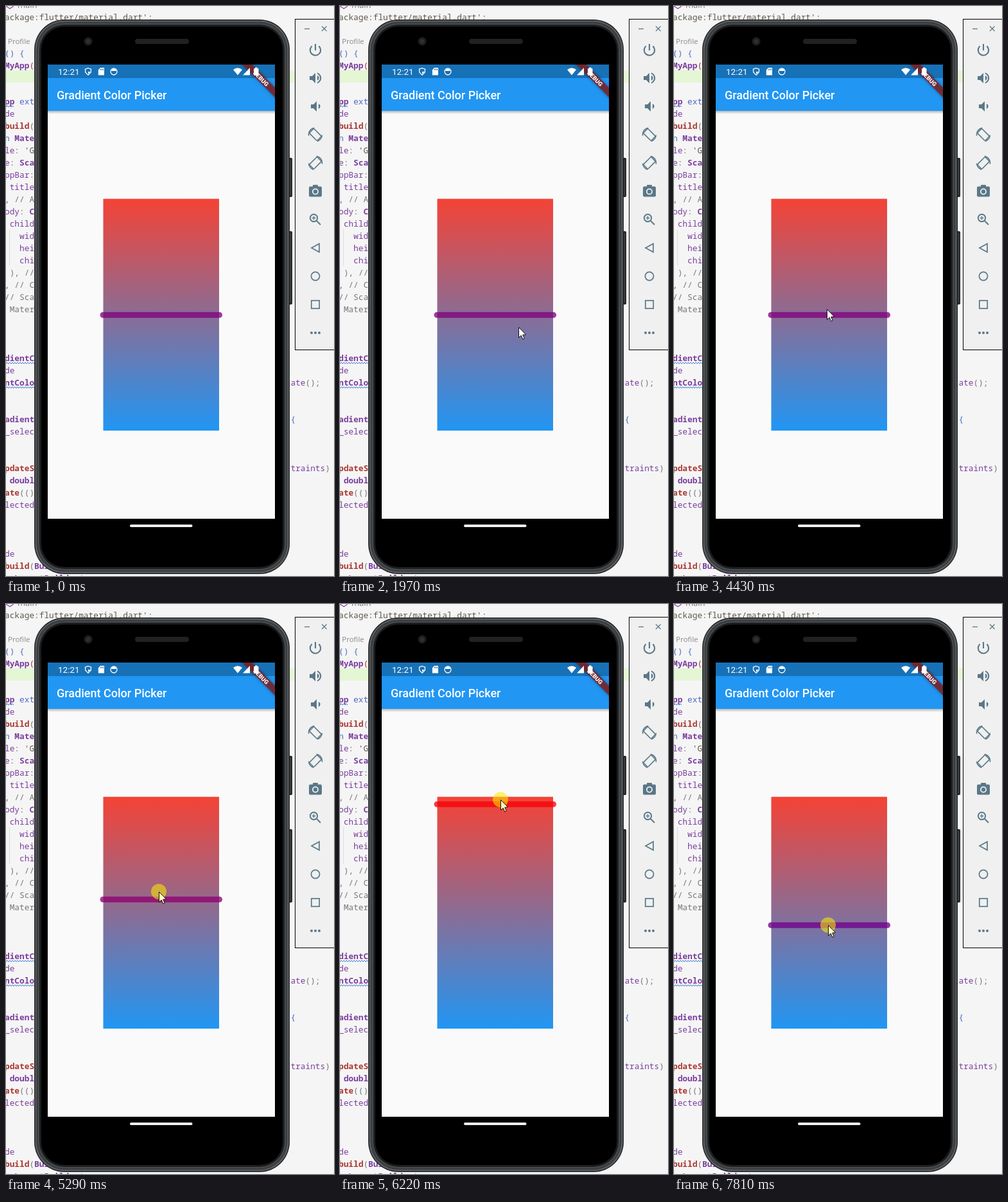
Animation of 511x886 px, one loop 8 s. Source, as an HTML page with a canvas:

```html
<!DOCTYPE html>
<html lang="en">
<head>
<meta charset="utf-8">
<title>Gradient Color Picker</title>
<style>
html, body { margin: 0; width: 100%; height: 100%; overflow: hidden; background: #f5f5f5; }
canvas { display: block; width: 511px; height: 886px; }
</style>
</head>
<body>
<canvas id="stage"></canvas>
<script>
const W = 511, H = 886, LOOP = 8000;
const canvas = document.getElementById('stage');
const dpr = window.devicePixelRatio || 1;
canvas.width = W * dpr;
canvas.height = H * dpr;
let ctx = canvas.getContext('2d');

const MONO = '"Noto Sans Mono", "DejaVu Sans Mono", monospace';
const SANS = 'Roboto, sans-serif';
const PURPLE = '#7a3e9d', RED = '#aa3731', BLUE = '#4b69c6', GRAY = '#777777', INK = '#5f584c';
const CHAR = 7.68;

// ---------- drawing helpers ----------
function box(x, y, w, h, r, fill) {
  ctx.beginPath();
  ctx.roundRect(x, y, w, h, r);
  ctx.fillStyle = fill;
  ctx.fill();
}
function disc(x, y, r, fill) {
  ctx.beginPath();
  ctx.arc(x, y, r, 0, Math.PI * 2);
  ctx.fillStyle = fill;
  ctx.fill();
}
function ring(x, y, r, from = 0, to = Math.PI * 2) {
  ctx.beginPath();
  ctx.arc(x, y, r, from, to);
  ctx.stroke();
}
function poly(points, close = true) {
  ctx.beginPath();
  points.forEach(([x, y]) => ctx.lineTo(x, y));
  if (close) ctx.closePath();
}
function label(str, x, y, font, fill) {
  ctx.font = font;
  ctx.fillStyle = fill;
  ctx.fillText(str, x, y);
}

// ---------- editor behind the phone ----------
// Each row: vertical centre, then [column, text, colour, bold]
const CODE = [
  [17, [0, "ackage:flutter/material.dart';", INK]],
  [73, [0, '() {', BLUE]],
  [92, [0, 'MyApp', PURPLE, 1], [5, '(', RED]],
  [148, [0, 'pp', PURPLE, 1], [3, 'ext', BLUE]],
  [167, [0, 'de', PURPLE]],
  [186, [0, 'build', RED, 1], [5, '(', GRAY]],
  [205, [0, 'n', BLUE], [2, 'Mate', PURPLE, 1]],
  [224, [0, 'le', PURPLE], [2, ':', GRAY], [4, "'G", INK]],
  [243, [0, 'e', PURPLE], [1, ':', GRAY], [3, 'Sca', PURPLE, 1]],
  [262, [0, 'ppBar', PURPLE], [5, ':', GRAY]],
  [281, [1, 'title', PURPLE]],
  [300, [0, ', // A', GRAY]],
  [319, [0, 'ody', PURPLE], [3, ':', GRAY], [5, 'C', PURPLE, 1]],
  [338, [1, 'child', PURPLE]],
  [357, [3, 'wid', PURPLE]],
  [376, [3, 'hei', PURPLE]],
  [395, [3, 'chi', PURPLE]],
  [414, [1, '), //', GRAY]],
  [433, [0, ', // C', GRAY]],
  [452, [0, '// Sca', GRAY]],
  [471, [1, 'Mater', GRAY]],
  [547, [0, 'dientC', PURPLE, 1]],
  [566, [0, 'de', PURPLE]],
  [585, [0, 'ntColo', PURPLE, 1], [57, 'tate', PURPLE], [61, '();', GRAY]],
  [642, [0, 'adient', PURPLE, 1], [58, '{', BLUE]],
  [661, [0, '_selec', PURPLE]],
  [718, [0, 'pdateS', RED, 1], [57, 'straints', PURPLE], [65, ')', GRAY]],
  [737, [1, 'doubl', PURPLE, 1]],
  [756, [0, 'ate', RED, 1], [3, '(()', GRAY]],
  [775, [0, 'lected', PURPLE]],
  [851, [0, 'de', PURPLE]],
  [870, [0, 'build', RED, 1], [5, '(', GRAY], [6, 'Bui', PURPLE, 1]],
  [889, [0, 'n', BLUE], [2, 'LayoutBuilder', PURPLE, 1], [15, '(', GRAY]]
];

function squiggle(y, end) {
  ctx.beginPath();
  for (let x = -2, i = 0; x <= end; x += 2, i++) ctx.lineTo(x, y + (i % 2 ? 1.1 : -1.1));
  ctx.strokeStyle = '#3f7fd6';
  ctx.lineWidth = 1;
  ctx.stroke();
}

function drawEditor() {
  ctx.fillStyle = '#f5f5f5';
  ctx.fillRect(0, 0, W, H);
  ctx.fillStyle = '#e4f6d4';
  ctx.fillRect(0, 100, 450, 19);
  ctx.fillStyle = '#dcdcdc';
  ctx.fillRect(5, 347, 1, 57);

  ctx.strokeStyle = PURPLE;
  ctx.lineWidth = 1.1;
  poly([[1, -3], [1, 1], [6, 4], [11, 1], [11, -3]], false);
  ctx.stroke();
  label('main', 18, 3, '13px "Open Sans", sans-serif', GRAY);
  label('Profile', 3, 59, '11.5px "Open Sans", sans-serif', '#8a8a8a');
  ctx.fillStyle = '#aaaaaa';
  ctx.fillRect(-1, 50, 1, 10);

  for (const [y, ...parts] of CODE)
    for (const [col, str, fill, bold] of parts)
      label(str, -2 + col * CHAR, y + 4.5, (bold ? 'bold ' : '') + '12.8px ' + MONO, fill);

  squiggle(156, 13);
  squiggle(555, 44);
  squiggle(593, 44);
}

// ---------- phone ----------
function drawFrame() {
  box(438, 236, 8, 61, 2, '#252627');
  box(438, 350, 8, 114, 2, '#252627');
  ctx.fillStyle = '#4a4c4e';
  ctx.fillRect(443, 239, 1, 55);
  ctx.fillRect(443, 353, 1, 108);

  const layers = [[0, '#222324'], [1.5, '#5d6163'], [3.5, '#3a3d3f'], [6, '#47494b'], [8, '#1c1d1e'], [11, '#000000']];
  for (const [d, fill] of layers)
    box(44 + d, 21 + d, 398 - 2 * d, 862 - 2 * d, 47 - d, fill);

  disc(128, 55, 6.5, '#1d1e1f');
  disc(128, 55, 3.5, '#2d2f31');
  box(201, 51, 84, 8, 4, '#202122');
  box(193, 806, 97.5, 4, 2, '#f2f2f2');
}

function drawStatusIcons() {
  label('12:21', 81, 106.5, '13.5px ' + SANS, '#ffffff');
  ctx.strokeStyle = ctx.fillStyle = '#ffffff';
  ctx.lineWidth = 1.3;

  // shield
  poly([[128, 96.5], [132.5, 98.2], [132.3, 103], [128, 107.4], [123.7, 103], [123.5, 98.2]]);
  ctx.stroke();
  poly([[128, 98], [128, 102], [131.5, 102], [128, 106]]);
  ctx.fill();

  // memory card
  poly([[147, 96], [153, 96], [153, 107.5], [143.8, 107.5], [143.8, 99.5]]);
  ctx.fill();
  ctx.fillStyle = '#1872ba';
  for (const x of [147, 149, 151]) ctx.fillRect(x, 97.5, 1, 2.5);

  ring(168, 102, 5);
  ctx.fillStyle = '#ffffff';
  ctx.fillRect(164.5, 98, 7, 3);

  // wifi, signal, battery
  ctx.beginPath();
  ctx.moveTo(361, 107.5);
  ctx.lineTo(354, 99);
  ctx.quadraticCurveTo(361, 93.5, 368, 99);
  ctx.fill();
  poly([[369, 107.5], [380, 107.5], [380, 96]]);
  ctx.fill();
  box(386, 97, 7.5, 11, 1, '#ffffff');
  ctx.fillRect(388, 95.5, 3.5, 2);
}

function drawScreen() {
  ctx.save();
  ctx.beginPath();
  ctx.rect(65, 91, 354, 706);
  ctx.clip();
  ctx.fillStyle = '#fafafa';
  ctx.fillRect(65, 91, 354, 706);

  const shade = ctx.createLinearGradient(0, 163, 0, 168);
  shade.addColorStop(0, 'rgba(0,0,0,.27)');
  shade.addColorStop(1, 'rgba(0,0,0,0)');
  ctx.fillStyle = shade;
  ctx.fillRect(65, 163, 354, 5);
  ctx.fillStyle = '#2196f3';
  ctx.fillRect(65, 112, 354, 51);
  ctx.fillStyle = '#1771b7';
  ctx.fillRect(65, 91, 354, 21);
  label('Gradient Color Picker', 79, 144.8, '500 18px ' + SANS, '#ffffff');

  ctx.save();
  ctx.translate(419, 91);
  ctx.rotate(Math.PI / 4);
  ctx.shadowColor = 'rgba(0,0,0,.5)';
  ctx.shadowBlur = 5 * dpr;
  ctx.fillStyle = 'rgba(135,30,30,.78)';
  ctx.fillRect(-40, 25.2, 80, 10.8);
  ctx.shadowColor = 'transparent';
  ctx.textAlign = 'center';
  label('DEBUG', 0, 34, '900 9.2px ' + SANS, '#ffffff');
  ctx.restore();

  drawStatusIcons();

  const fade = ctx.createLinearGradient(0, 300, 0, 660);
  fade.addColorStop(0, '#f44336');
  fade.addColorStop(1, '#2196f3');
  ctx.fillStyle = fade;
  ctx.fillRect(151.5, 299.7, 180.5, 360.3);
  ctx.restore();
}

// ---------- emulator toolbar ----------
function speaker(x, y) {
  poly([[x, y - 3], [x + 4, y - 3], [x + 9, y - 8], [x + 9, y + 8], [x + 4, y + 3], [x, y + 3]]);
  ctx.fill();
  ctx.beginPath();
  ctx.arc(x + 10.5, y, 4, -1.2, 1.2);
  ctx.fill();
}

function rotateIcon(y, flip) {
  ctx.save();
  ctx.translate(482, y);
  ctx.scale(flip, 1);
  ring(0, 0, 10.5, Math.PI * 0.95, Math.PI * 1.45);
  ring(0, 0, 10.5, Math.PI * 0.02, Math.PI * 0.42);
  ctx.rotate(Math.PI / 4);
  ctx.beginPath();
  ctx.roundRect(-8.5, -5, 17, 10, 1.5);
  ctx.stroke();
  ctx.restore();
}

function drawToolbar() {
  const tone = '#5a7887', back = '#f0f0f0';
  ctx.fillStyle = back;
  ctx.fillRect(450, 20, 61, 515);
  ctx.strokeStyle = '#000000';
  ctx.lineWidth = 1;
  ctx.strokeRect(450.5, 20.5, 64, 514);

  ctx.strokeStyle = ctx.fillStyle = tone;
  ctx.lineWidth = 1.3;
  poly([[465, 35.5], [473, 35.5]], false);
  ctx.stroke();
  poly([[492, 31.5], [499.5, 39]], false);
  ctx.stroke();
  poly([[499.5, 31.5], [492, 39]], false);
  ctx.stroke();

  ctx.lineWidth = 2.1;
  ring(482, 68.5, 8.2, -0.85, Math.PI + 0.85);
  poly([[482, 59], [482, 69]], false);
  ctx.stroke();

  speaker(473, 112);
  ring(482, 112, 8.2, -1.2, 1.2);
  speaker(475, 156);

  ctx.lineWidth = 1.6;
  rotateIcon(200, 1);
  rotateIcon(244, -1);

  box(472, 280.5, 20, 16, 2, tone);
  box(478, 278, 8, 5, 1, tone);
  disc(482, 288.5, 5, back);
  disc(482, 288.5, 3.2, tone);

  ctx.strokeStyle = tone;
  ctx.lineWidth = 1.9;
  ring(479.5, 329.5, 5.7);
  poly([[484, 334], [490, 340]], false);
  ctx.stroke();
  ctx.lineWidth = 1.4;
  poly([[476.5, 329.5], [482.5, 329.5]], false);
  ctx.stroke();
  poly([[479.5, 326.5], [479.5, 332.5]], false);
  ctx.stroke();

  ctx.lineWidth = 1.7;
  poly([[476, 376], [488, 369.5], [488, 382.5]]);
  ctx.stroke();
  ring(482, 420, 6.6);
  ctx.strokeRect(475.8, 457.8, 12.4, 12.4);
  for (const x of [476, 482, 488]) disc(x, 508, 2, tone);
}

// ---------- motion ----------
// Pointer keys: [tick, x, y]
const PATH = [
  [0, 434, 796], [1, 362, 619], [6, 362, 619], [8, 346, 596], [12, 294, 521], [14, 278, 499],
  [19, 267, 489], [23, 263, 480], [24, 263, 480], [26, 260, 452], [30, 252, 372], [32, 250, 354],
  [36, 250, 354], [37, 258, 376], [40, 267, 450], [43, 253, 507], [45, 241, 484], [47, 241, 484],
  [50, 238, 468], [53, 238, 477], [62, 238, 477], [63, 238, 459], [64, 238, 447], [75, 247, 318],
  [77, 249, 311], [78, 250, 304], [82, 250, 295], [89, 250, 295], [91, 247, 312], [93, 243, 349],
  [94, 242, 372], [98, 240, 453], [101, 240, 499]
];
const START = 1033, TICK = 66.37, PRESS = 56, DRAG = 59;

function pointerAt(tick) {
  const next = PATH.findIndex(key => key[0] > tick);
  if (next < 0) return PATH[PATH.length - 1].slice(1);
  const a = PATH[next - 1], b = PATH[next];
  const k = (tick - a[0]) / (b[0] - a[0]);
  return [1, 2].map(i => Math.round(a[i] + (b[i] - a[i]) * k));
}

function drawSlider(y) {
  const k = (y - 300) / 360;
  ctx.strokeStyle = `rgba(${Math.round(255 * (1 - k))},0,${Math.round(255 * k)},.77)`;
  ctx.lineWidth = 9;
  ctx.lineCap = 'round';
  poly([[151, y + 0.3], [332.5, y + 0.3]], false);
  ctx.stroke();
  ctx.lineCap = 'butt';
}

function drawPointer(x, y, pressed) {
  if (pressed) disc(x, y, 12, 'rgba(255,235,0,.56)');
  ctx.save();
  ctx.translate(x + 0.5, y + 0.5);
  poly([[0, 0], [0, 16], [3.7, 12.6], [6.3, 18.5], [8.7, 17.4], [6.2, 11.7], [11, 11.3]]);
  ctx.fillStyle = pressed ? '#ffffc0' : '#ffffff';
  ctx.fill();
  ctx.strokeStyle = '#111111';
  ctx.lineWidth = 1;
  ctx.stroke();
  ctx.restore();
}

// The still scene is painted once and reused.
const still = document.createElement('canvas');
still.width = canvas.width;
still.height = canvas.height;
const view = ctx;
ctx = still.getContext('2d');
ctx.scale(dpr, dpr);
drawEditor();
drawFrame();
drawScreen();
drawToolbar();
ctx = view;

function render(time) {
  const tick = Math.floor((time - START) / TICK);
  ctx.setTransform(1, 0, 0, 1, 0, 0);
  ctx.drawImage(still, 0, 0);
  ctx.scale(dpr, dpr);
  // The slider trails the pointer by one tick and stops at the ends.
  const y = tick < DRAG ? 480 : Math.min(660, Math.max(300, pointerAt(tick - 1)[1]));
  drawSlider(y);
  if (tick >= 0) drawPointer(...pointerAt(tick), tick >= PRESS);
}

const begin = performance.now();
function loop() {
  render((performance.now() - begin) % LOOP);
  requestAnimationFrame(loop);
}
loop();
</script>
</body>
</html>
```
